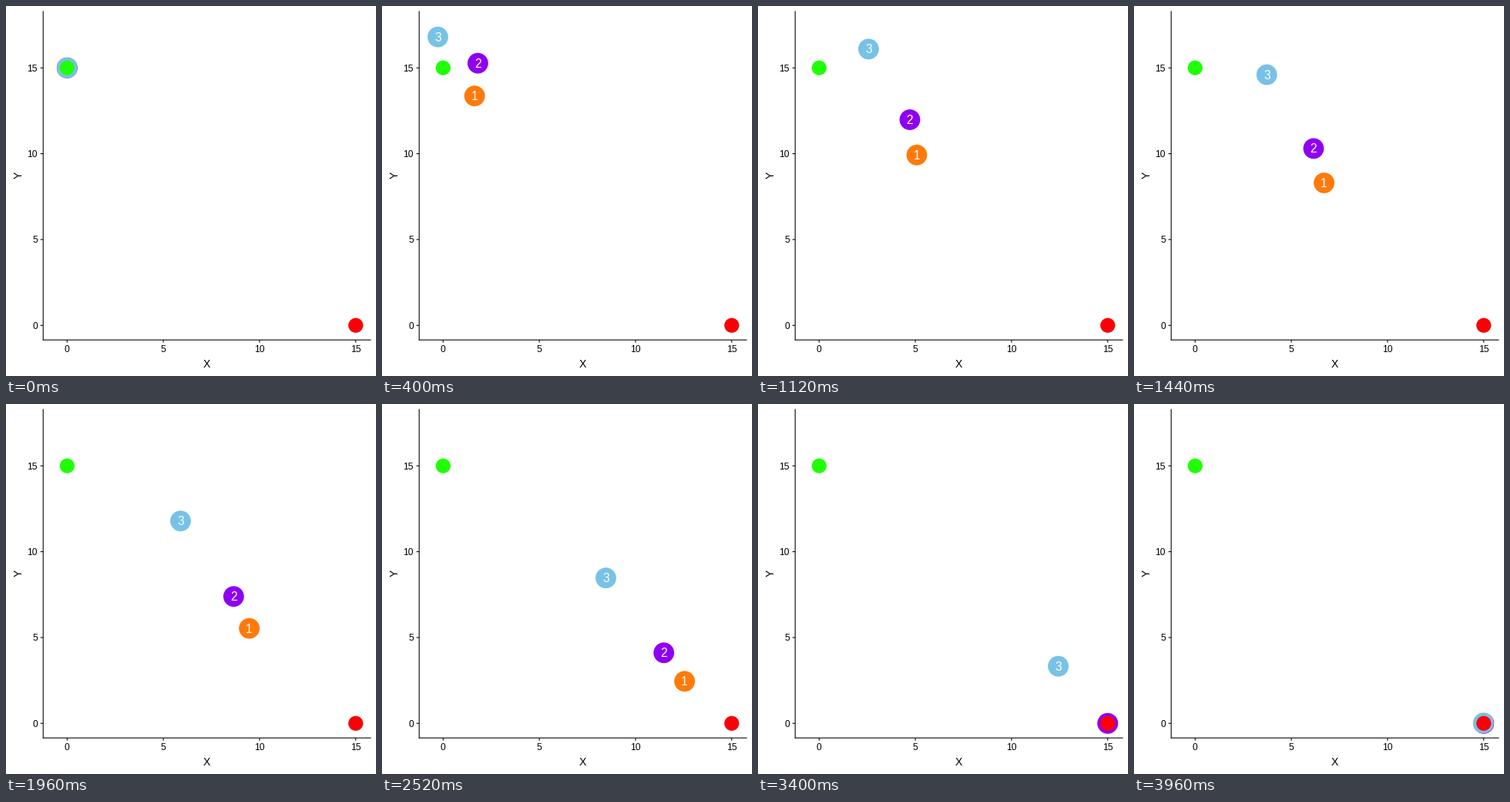
Write a matplotlib script that moves like this. It is 480x480 px and loops after 4000 ms.

```python
import math
import matplotlib.pyplot as plt
from matplotlib.animation import FuncAnimation
from matplotlib.patches import Circle

SIZE, FRAMES, STEPS = 480, 100, 75
START, GOAL = (0, 15), (15, 0)
SLOW, FAST, EASE = 0.266, 0.4, 0.92
TURN = math.radians(11.14)
LEFT, BOTTOM = 48.2, 433.2

plt.rcParams["font.family"] = "Liberation Sans"


def px(x, y):
    return 79.3 + 24.96 * x, 414.3 - 22.27 * y


def walk(heading, speed_up):
    """Steer towards the goal with a limited turn, then gain speed."""
    x, y = START
    a = math.radians(heading)
    path = [(x, y)]
    for k in range(STEPS):
        dx, dy = GOAL[0] - x, GOAL[1] - y
        dist = math.hypot(dx, dy)
        if dist > 0.01:
            if k:
                err = math.remainder(math.atan2(dy, dx) - a, math.tau)
                a += max(-TURN, min(TURN, err))
            v = FAST - (FAST - SLOW) * EASE ** max(0, k - speed_up)
            v = min(v, dist)
            x += v * math.cos(a)
            y += v * math.sin(a)
        path.append((x, y))
    return path


def place(path, frame):
    """Each step lands on a whole frame; frames between are blended."""
    keys = [round(k * (FRAMES - 1) / STEPS) for k in range(STEPS + 1)]
    k = max(i for i, f in enumerate(keys) if f <= frame)
    if k == STEPS:
        return px(*path[k])
    t = (frame - keys[k]) / (keys[k + 1] - keys[k])
    (x0, y0), (x1, y1) = path[k], path[k + 1]
    return px(x0 + (x1 - x0) * t, y0 + (y1 - y0) * t)


fig = plt.figure(figsize=(SIZE / 72, SIZE / 72), dpi=72, facecolor="white")
ax = fig.add_axes([0, 0, 1, 1])
ax.set(xlim=(0, SIZE), ylim=(SIZE, 0))
ax.axis("off")


def line(xs, ys):
    ax.plot(xs, ys, color="black", lw=1.07, solid_capstyle="butt", snap=False)


def text(x, y, s, size, **kw):
    kw = {"ha": "center", "va": "baseline", "color": "black", **kw}
    return ax.text(x, y, s, fontsize=size, **kw)


line([LEFT, LEFT], [6.5, BOTTOM + 0.5])
line([LEFT - 0.5, 473.5], [BOTTOM, BOTTOM])
for n in (0, 5, 10, 15):
    tx, ty = px(n, n)
    line([tx, tx], [BOTTOM, BOTTOM + 3.5])
    line([LEFT - 3.5, LEFT], [ty, ty])
    text(tx, 449.3, str(n), 12)
    text(41, ty + 4.3, str(n), 12, ha="right")
text(260.5, 469, "X", 14)
text(17.2, 219.6, "Y", 14, rotation=90, va="center")

paths = [walk(-45, -1.5), walk(45, 6), walk(135, 18)]
colors = ["#FF7A0A", "#9000F0", "#77C2E5"]
discs, labels = [], []
for i, color in enumerate(colors):
    discs.append(ax.add_patch(Circle(px(*START), 13.4, fc=color, lw=0, zorder=3)))
    labels.append(text(0, 0, str(i + 1), 15.5, color="white", zorder=4))
for spot, color in ((START, "#21FF06"), (GOAL, "#FB0007")):
    ax.add_patch(Circle(px(*spot), 9.6, fc=color, lw=0, zorder=5))


def draw(frame):
    for path, disc, label in zip(paths, discs, labels):
        x, y = place(path, frame)
        disc.center = x, y
        label.set_position((x, y + 5.6))
    return discs + labels


anim = FuncAnimation(fig, draw, frames=FRAMES, interval=40, repeat=True, repeat_delay=0)
plt.show()
```
